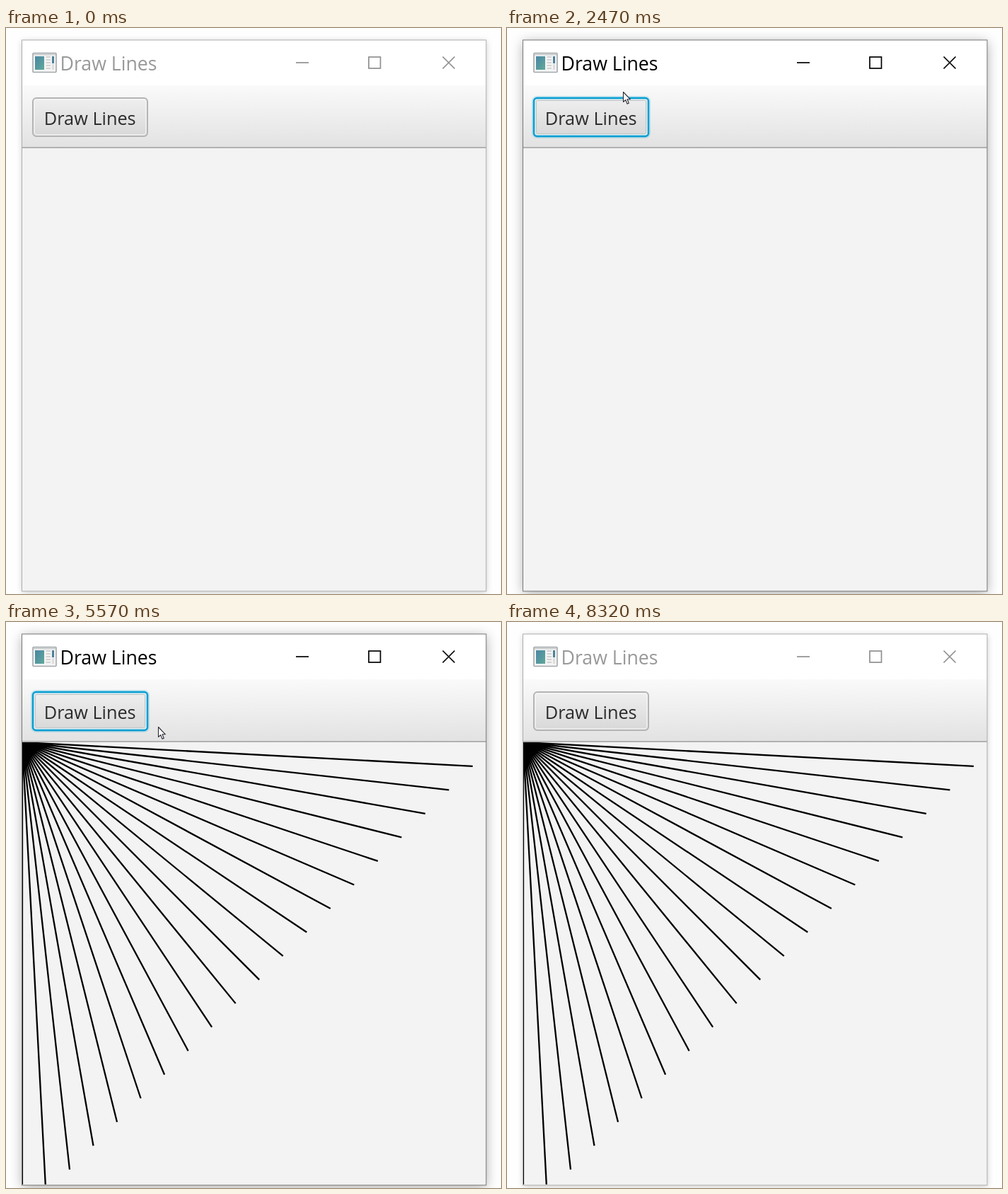
These frames come from a looping animation (700x800 px, 8.45 s). An HTML page:

```html
<!DOCTYPE html>
<html lang="en">
<head>
<meta charset="utf-8">
<title>Draw Lines</title>
<style>
  html, body { margin: 0; width: 100%; height: 100%; overflow: hidden; background: #fefefe; }
  svg { position: absolute; left: 0; top: 0; }
  text { font-family: "Open Sans", "Noto Sans", sans-serif; }
  #shadow {
    position: absolute; left: 23px; top: 17px; width: 656px; height: 779px;
    box-shadow: 0 2px 9px rgba(0,0,0,.2);
  }
  .active #shadow { box-shadow: 0 3px 16px rgba(0,0,0,.32); }
  #title { fill: #999; font-size: 26.7px; }
  #caption { fill: #2b2b2b; font-size: 25.3px; }
  #controls { fill: none; stroke: #8f8f8f; stroke-width: 1.7; }
  #frame { fill: none; stroke: #adadad; }
  .active #title { fill: #000; }
  .active #controls { stroke: #000; }
  .active #frame { stroke: #777; }
  #red, #focus, #lines, #click { display: none; }
  .active #focus, .drawn #lines, .closing #red, .clicked #click { display: inline; }
  .active.closing #cross { stroke: #fff; }
  .active #plain { display: none; }
  #face { fill: url(#normal); }
  .hover #face { fill: url(#light); }
  .pressed #face { fill: url(#dark); }
  .pressed #caption { fill: #444; }
  #lines { stroke: #000; stroke-width: 2.3; }
</style>
</head>
<body>
<div id="shadow"></div>
<svg width="700" height="800" viewBox="0 0 700 800">
  <defs>
    <linearGradient id="bar" x2="0" y2="1"><stop stop-color="#fafafa"/><stop offset="1" stop-color="#e2e2e2"/></linearGradient>
    <linearGradient id="normal" x2="0" y2="1"><stop stop-color="#efefef"/><stop offset="1" stop-color="#d8d8d8"/></linearGradient>
    <linearGradient id="light" x2="0" y2="1"><stop stop-color="#f6f6f6"/><stop offset="1" stop-color="#e2e2e2"/></linearGradient>
    <linearGradient id="dark" x2="0" y2="1"><stop stop-color="#dedede"/><stop offset="1" stop-color="#c8c8c8"/></linearGradient>
    <linearGradient id="teal" x2="1" y2="1"><stop stop-color="#4a86a4"/><stop offset="1" stop-color="#5fa99a"/></linearGradient>
    <clipPath id="pane"><path d="M23 170H679V795H23z"/></clipPath>
  </defs>

  <path fill="#fff" d="M23 17H679V82H23z"/>
  <path fill="url(#bar)" d="M23 81H679V169H23z"/>
  <path fill="#f3f3f3" d="M23 169H679V796H23z"/>
  <path stroke="#b2b2b2" stroke-width="2" d="M23 169H679"/>

  <g id="icon">
    <rect x="38" y="35.5" width="33" height="27" rx="1" fill="#f4f4f4" stroke="#a3a8aa" stroke-width="1.6"/>
    <path stroke="#c9cdce" stroke-width="2" d="M39 37.5H70"/>
    <path fill="url(#teal)" d="M41 40H54V59H41z"/>
    <path stroke="#c8c8c8" stroke-width="1.3" d="M56.5 41H63M56.5 45H63M56.5 49H63M56.5 53H63M56.5 57H63"/>
    <path fill="#4d8299" d="M65 40H68V50H65z"/>
    <path fill="#dedede" d="M65 51H68V59H65z"/>
  </g>
  <text id="title" x="76.5" y="60">Draw Lines</text>

  <path id="red" fill="#e81123" d="M575 17.5H679V80H575z"/>
  <g id="controls">
    <path d="M410 49H428"/>
    <rect x="513" y="41" width="16.5" height="16"/>
    <path id="cross" d="M617.5 40.5L634.5 57.5M634.5 40.5L617.5 57.5"/>
  </g>

  <rect id="face" x="38" y="99" width="162" height="54" rx="5"/>
  <g id="plain" fill="none">
    <rect x="38" y="99" width="162" height="54" rx="5" stroke="#b4b4b4" stroke-width="2"/>
    <rect x="40" y="101" width="158" height="50" rx="4" stroke="#f7f7f7" stroke-opacity=".8" stroke-width="1.5"/>
  </g>
  <g id="focus" fill="none">
    <rect x="36.5" y="97.5" width="165" height="57" rx="6" stroke="#039ed3" stroke-opacity=".2" stroke-width="3"/>
    <rect x="40" y="101" width="158" height="50" rx="3" stroke="#d9eaf0" stroke-width="2.5"/>
    <rect x="41.5" y="102.5" width="155" height="47" rx="2" stroke="#c4c4c4"/>
    <rect x="38" y="99" width="162" height="54" rx="4.5" stroke="#079dd1" stroke-width="2.4"/>
  </g>
  <text id="caption" x="53.8" y="137">Draw Lines</text>

  <g clip-path="url(#pane)"><path id="lines"/></g>
  <rect id="frame" x="22.5" y="17" width="656.5" height="779"/>
  <circle id="click" r="11" fill="#ebe645" fill-opacity=".75"/>
  <path id="cursor" fill="#fff" stroke="#2a2a35" stroke-width="1.1" stroke-linejoin="round"
        d="M.5 .5V14.5L3.7 11.6L6 17.2L8.3 16.2L6 10.8H10.4z"/>
</svg>
<script>
  const LOOP = 8450, STEP = 33.53;
  const get = id => document.getElementById(id);
  const cursor = get("cursor"), click = get("click");

  let fan = "";
  for (let i = 1; i <= 20; i++) fan += `M23 170L${693.5 - STEP * i} ${170.3 + STEP * i}`;
  get("lines").setAttribute("d", fan);

  // Pointer moves: start, end, number of positions, from x, y, to x, y.
  // The pointer rests after each move; a row holding only a time hides it.
  const moves = [
    [0],
    [610, 1360, 7, 335, 259, 150, 119],
    [1480, 1730, 3, 168, 94, 203, 45],
    [2230, 2840, 6, 190, 60, 124, 135],
    [3090, 3210, 2, 122, 135, 121, 135],
    [4090, 4210, 2, 120, 135, 121, 135],
    [5570, 5950, 4, 215, 148, 670, 757],
    [6200],
    [6700, 6825, 2, 671, 317, 566, 110],
    [6950, 7075, 2, 610, 18, 620, 15],
    [7200, 7450, 3, 627, 42, 622, 98],
    [7570, 7700, 2, 685, 632, 685, 632],
    [7700]
  ];

  function pointer(t) {
    const [start, end, count, x0, y0, x1, y1] = moves.findLast(m => m[0] <= t);
    if (!end) return null;
    const last = count - 1;
    const k = Math.min(last, Math.floor((t - start) / (end - start) * last + .04)) / last;
    return [Math.round(x0 + (x1 - x0) * k), Math.round(y0 + (y1 - y0) * k)];
  }

  const during = (t, from, to) => t >= from && t < to;

  function draw(now) {
    const t = Math.max(0, now) % LOOP;
    const p = pointer(t);
    const pressed = during(t, 3350, 3460);
    const state = {
      active: during(t, 1870, 8320),
      drawn: t >= 3460,
      closing: during(t, 6950, 7570),
      clicked: pressed || during(t, 1870, 1980),
      hover: p && during(p[0], 37, 201) && during(p[1], 98, 154),
      pressed
    };
    for (const name in state) document.body.classList.toggle(name, !!state[name]);
    cursor.style.visibility = p ? "visible" : "hidden";
    if (p) {
      const place = `translate(${p[0]} ${p[1]})`;
      cursor.setAttribute("transform", place);
      click.setAttribute("transform", place);
    }
    requestAnimationFrame(draw);
  }
  draw(performance.now());
</script>
</body>
</html>
```
